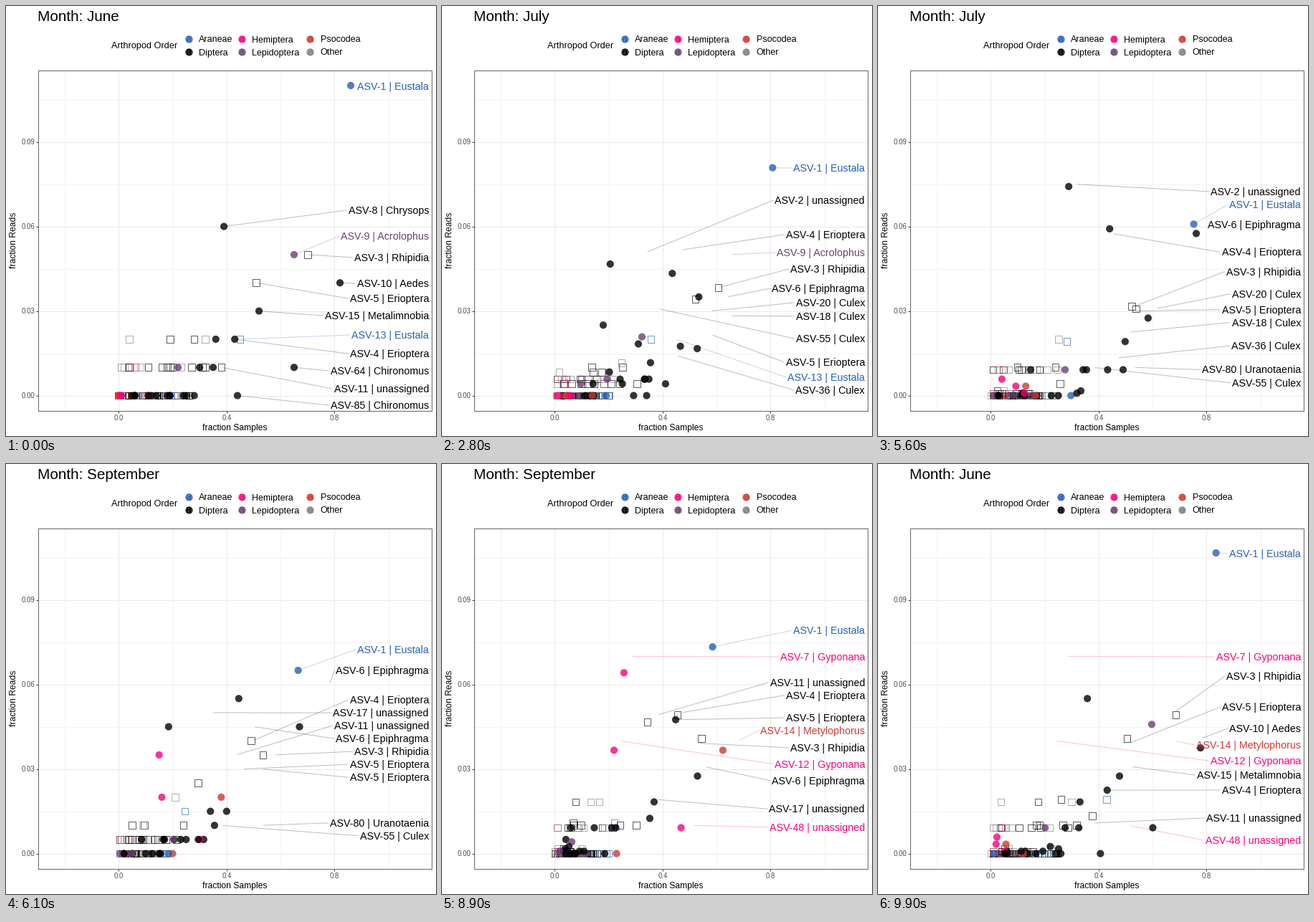
These frames come from a looping animation (600x600 px, 10 s). A matplotlib script:

```python
from itertools import zip_longest

import matplotlib.pyplot as plt
import numpy as np
from matplotlib.animation import FuncAnimation
from matplotlib.collections import LineCollection
from matplotlib.colors import to_rgba

PX = 0.72  # points per pixel at 100 dpi
FRAMES, INTERVAL = 100, 100
MONTHS = ["June", "July", "September"]
STARTS, STEPS = [21, 55, 88], 12
PANEL = (44.5, 89.5, 593.5, 564.5)
COLORS = dict(b="#2860b4", k="#000000", m="#f9007c", p="#6c3f75",
              r="#cb3b33", g="#808080")

plt.rcParams["font.family"] = "Liberation Sans"
rng = np.random.default_rng(7)


def sx(x):
    return 157.2 + 376.6 * x


def sy(y):
    return 543.6 - 3933 * y


# Points: each has a colour, a marker and one position per month,
# given in hundredths of the axis units.
points, taxa = [], {}


def dot(color, marker, *path):
    xy = np.array(path) / 100
    points.append((color, marker, np.column_stack([sx(xy[:, 0]), sy(xy[:, 1])])))


def asv(num, genus, color, marker, *path):
    dot(color, marker, *path)
    taxa[num] = (f"ASV-{num} | {genus}", color, points[-1][2])


# Crowd along the zero line: count and upper/lower x for each month
def crowd(color, count, *spans):
    for _ in range(count):
        dot(color, "s", *[(round(rng.uniform(*s)), 0) for s in spans])


crowd("k", 44, (0, 28), (0, 18), (0, 17))
crowd("g", 20, (0, 12), (0, 27), (0, 9))
crowd("p", 16, (2, 12), (4, 16), (1, 11))
crowd("m", 5, (3, 9), (1, 10), (2, 10))
crowd("r", 9, (0, 1), (1, 9), (3, 13))
crowd("b", 3, (18, 23), (12, 20), (15, 22))

# Squares lifted off the zero line in July or September only
for c, x in zip("krkgkkkgkgg", [1, 3, 5, 7, 11, 12, 15, 18, 19, 22, 26]):
    dot(c, "s", (round(x * .6), 0), (x, 1), (round(x * .4), 0))
for c, x in zip("mgkkpgkgk", [1, 1, 5, 6, 9, 11, 18, 19, 22]):
    dot(c, "s", (round(x * .7), 0), (round(x * .6), 0), (x, 1))

# Squares lifted in June
dot("g", "s", (1, 1), (1, 0), (0, 0))
dot("g", "s", (2, 1), (4, 0), (1, 0))
dot("k", "s", (4, 1), (3, 0), (2, 0))
dot("k", "s", (4, 1), (8, 0), (4, 0))
dot("m", "s", (6, 1), (2, 0), (1, 0))
dot("g", "s", (8, 1), (12, 0), (3, 0))
dot("k", "s", (11, 1), (9, 0), (5, 0))
dot("k", "s", (16, 1), (10, 0), (5, 0))
dot("k", "s", (18, 1), (12, 0), (6, 1))
dot("k", "s", (19, 1), (10, 1), (9, 1))
dot("k", "s", (20, 1), (17, 0), (3, 0))
dot("g", "s", (23, 1), (15, 0), (8, 0))
dot("k", "s", (27, 1), (24, 1), (24, 1))
dot("k", "s", (31, 1), (19, 0), (3, 0))
dot("k", "s", (32, 1), (13, 0), (30, 1))
dot("g", "s", (4, 2), (0, 0), (1, 0))
dot("k", "s", (19, 2), (11, 0), (2, 0))
dot("k", "s", (28, 2), (10, 0), (5, 1))
dot("g", "s", (32, 2), (11, 0), (8, 0))
dot("k", "s", (5, 0), (2, 0), (8, 2))
dot("g", "s", (6, 0), (4, 0), (14, 2))
dot("g", "s", (23, 0), (26, 2), (16, 2))

# Unlabelled circles
dot("k", "o", (30, 1), (3, 0), (1, 0))
dot("k", "o", (35, 1), (18, 0), (7, 0))
dot("k", "o", (36, 2), (9, 0), (1, 0))
dot("k", "o", (28, 0), (37, 1), (4, 0))
dot("k", "o", (12, 0), (11, 0), (22, 1))
dot("k", "o", (19, 0), (11, 0), (23, 1))
dot("k", "o", (14, 0), (13, 0), (7, 0))
dot("p", "o", (22, 1), (1, 0), (0, 0))
dot("p", "o", (6, 0), (29, 1), (12, 0))
dot("r", "o", (11, 0), (16, 0), (24, 0))
dot("b", "o", (1, 0), (32, 0), (5, 0))

asv(1, "Eustala", "b", "o", (86, 11), (77, 6), (56, 7))
asv(2, "unassigned", "k", "o", (6, 0), (31, 8), (6, 1))
asv(3, "Rhipidia", "k", "s", (70, 5), (54, 3), (53, 4))
asv(4, "Erioptera", "k", "o", (43, 2), (44, 6), (45, 5))
asv(5, "Erioptera", "k", "s", (51, 4), (53, 3), (45, 5))
asv(6, "Epiphragma", "k", "o", (19, 0), (78, 6), (56, 3))
asv(7, "Gyponana", "m", "o", (0, 0), (2, 0), (28, 7))
asv(8, "Chrysops", "k", "o", (39, 6), (3, 0), (1, 0))
asv(9, "Acrolophus", "p", "o", (65, 5), (9, 0), (1, 0))
asv(10, "Aedes", "k", "o", (82, 4), (32, 0), (31, 1))
asv(11, "unassigned", "k", "s", (38, 1), (25, 0), (34, 5))
asv(12, "Gyponana", "m", "o", (0, 0), (8, 0), (24, 4))
asv(13, "Eustala", "b", "s", (45, 2), (29, 2), (20, 1))
asv(14, "Metylophorus", "r", "o", (0, 0), (8, 0), (68, 4))
asv(15, "Metalimnobia", "k", "o", (52, 3), (16, 1), (1, 0))
asv(17, "unassigned", "k", "o", (24, 0), (33, 0), (38, 2))
asv(18, "Culex", "k", "o", (11, 0), (53, 2), (15, 1))
asv(20, "Culex", "k", "o", (25, 0), (62, 3), (18, 0))
asv(36, "Culex", "k", "o", (18, 0), (47, 1), (3, 0))
asv(48, "unassigned", "m", "o", (1, 0), (9, 0), (51, 1))
asv(55, "Culex", "k", "o", (5, 0), (38, 1), (8, 0))
asv(64, "Chironomus", "k", "o", (65, 1), (24, 0), (6, 0))
asv(80, "Uranotaenia", "k", "o", (6, 0), (53, 1), (6, 0))
asv(85, "Chironomus", "k", "o", (44, 0), (27, 0), (4, 0))

# Label heights at rest, by month
REST = [
    {1: 112, 8: 285, 9: 321, 3: 351, 10: 387, 5: 408, 15: 432, 13: 459,
     4: 485, 64: 509, 11: 534, 85: 557},
    {2: 249, 1: 271, 6: 308, 4: 337, 3: 375, 20: 404, 5: 426, 18: 453,
     36: 486, 80: 507, 55: 529},
    {1: 243, 7: 269, 11: 301, 4: 323, 5: 347, 14: 367, 3: 392, 12: 419,
     6: 452, 17: 480, 48: 505},
]
# Heights on the way: step, labels taking a new name, labels leaving
VIA = [
    (7, {1: 226, 2: 271, 4: 319, 3: 367, 6: 394, 20: 414, 18: 433, 55: 464,
         5: 497, 36: 536}, {9: 344, 13: 518}),
    (11, {1: 249, 11: 302, 4: 326, 5: 356, 3: 378, 6: 408, 17: 446},
     {6: 272, 5: 426, 55: 494, 80: 512}),
    (11, {1: 125, 3: 296, 5: 339, 10: 369, 15: 434, 4: 455, 11: 494},
     {7: 269, 14: 392, 12: 414, 48: 525}),
]


def pairs(month):
    """Match labels of one month with the next, colour by colour."""
    def ids(m, c):
        return sorted((i for i in REST[m] if taxa[i][1] == c), key=str)

    nxt = (month + 1) % 3
    return [(a, b) for c in COLORS
            for a, b in zip_longest(ids(month, c), ids(nxt, c)) if a]


PAIRS = [pairs(m) for m in range(3)]


def spread(ys, gap=18):
    ys = np.array(ys, float)
    order = np.argsort(ys, kind="stable")
    s = ys[order]
    for _ in range(60):
        for i in range(len(s) - 1):
            push = (gap - (s[i + 1] - s[i])) / 2
            if push > 0:
                s[i] -= push
                s[i + 1] += push
        s = np.minimum(s, 557)
    ys[order] = s
    return ys


def labels_at(month, t):
    nxt = (month + 1) % 3
    step, moving, leaving = VIA[month]
    out = []
    for a, b in PAIRS[month]:
        name, color, pos = taxa[a]
        tip, y0 = pos[month], REST[month][a]
        if b:
            tip = tip + (taxa[b][2][nxt] - tip) * t
            y = np.interp(t, [0, step / STEPS, 1],
                          [y0, moving[b], REST[nxt][b]])
            name = taxa[b if t >= 0.5 else a][0]
        else:
            y = np.interp(t, [0, step / STEPS], [y0, leaving[a]])
        out.append((name, color, tip, y))
    ys = spread([o[3] for o in out]) if t else [o[3] for o in out]
    return [(n, c, p, y) for (n, c, p, _), y in zip(out, ys)]


fig = plt.figure(figsize=(6, 6), dpi=100, facecolor="white")
ax = fig.add_axes([0, 0, 1, 1])
ax.set(xlim=(0, 600), ylim=(600, 0))
ax.axis("off")


def line(xs, ys, color, width, z=1):
    ax.plot(xs, ys, color=color, lw=width * PX, zorder=z,
            solid_capstyle="butt")


def text(x, y, s, size, **kw):
    return ax.text(x, y, s, fontsize=size * PX, **kw)


left, top, right, bottom = PANEL
for i in range(-1, 6):
    if sx(i / 5) < right:
        line([sx(i / 5)] * 2, [top, bottom], "#ebebeb", 0.6 if i % 2 else 1.1)
for i in range(8):
    line([left, right], [sy(i * .015)] * 2, "#ebebeb", 0.6 if i % 2 else 1.1)
line([left, right, right, left, left], [top, top, bottom, bottom, top],
     "#666666", 1, 2)
for v in (0, 0.4, 0.8):
    line([sx(v)] * 2, [bottom, bottom + 3], "#333333", 1)
    text(sx(v), 578.3, f"{v:.1f}", 9.6, ha="center", color="#4d4d4d")
for v in (0, 0.03, 0.06, 0.09):
    line([left - 3, left], [sy(v)] * 2, "#333333", 1)
    text(40, sy(v) + 3.5, f"{v:.2f}", 9.6, ha="right", color="#4d4d4d")
text(319, 592, "fraction Samples", 12.1, ha="center")
text(11, 327, "fraction Reads", 12.1, ha="center", va="center", rotation=90)

# Legend
text(147, 59.5, "Arthropod Order", 12.7)
ORDERS = ["Araneae", "Diptera", "Hemiptera", "Lepidoptera", "Psocodea", "Other"]
for i, (name, c) in enumerate(zip(ORDERS, "bkmprg")):
    x, y = (254.5, 328.5, 424)[i // 2], 46 + 18 * (i % 2)
    ax.scatter([x], [y], s=(10.4 * PX) ** 2, color=COLORS[c], alpha=0.8, lw=0)
    text(x, y + 4.2, "a", 14.2, ha="center", color=COLORS[c])
    text(x + 14.5, y + 4.5, name, 12.5)

title = text(44, 21, "", 20.7)


def layer(marker, **kw):
    rows = [p for p in points if p[1] == marker]
    rgba = [to_rgba(COLORS[p[0]], 0.8) for p in rows]
    paths = np.array([p[2] for p in rows])
    art = ax.scatter(paths[:, 0, 0], paths[:, 0, 1], marker=marker, zorder=4)
    art.set(**kw)
    if marker == "o":
        art.set(facecolors=rgba, edgecolors="none")
    else:
        art.set(facecolors="none", edgecolors=[c[:3] + (0.7,) for c in rgba])
    return art, paths


layers = [layer("s", sizes=[(9.6 * PX) ** 2], linewidths=0.9 * PX),
          layer("o", sizes=[(10.2 * PX) ** 2])]
links = LineCollection([], linewidths=1 * PX, zorder=3)
ax.add_collection(links)
tags = [text(590, 0, "", 14.2, ha="right", zorder=5) for _ in range(14)]


def update(f):
    month = 0 if f < 33 else 1 if f < 67 else 2
    nxt = (month + 1) % 3
    t = min(max((f - STARTS[month]) / STEPS, 0), 1)
    title.set_text("Month: " + MONTHS[nxt if t >= 0.5 else month])
    for art, paths in layers:
        art.set_offsets(paths[:, month] * (1 - t) + paths[:, nxt] * t)

    segs, shades = [], []
    for tag in tags:
        tag.set_text("")
    for tag, (name, c, tip, y) in zip(tags, labels_at(month, t)):
        tag.set(text=name, color=COLORS[c], position=(590, y + 5))
        start = np.array([tag.get_window_extent().x0 - 2, y])
        gap = start - tip
        dist = np.hypot(*gap)
        if dist > 9:
            segs.append([start, tip + gap / dist * 2])
            shades.append(to_rgba(COLORS[c], 0.26))
    links.set_segments(segs)
    links.set_color(shades)
    return []


anim = FuncAnimation(fig, update, frames=FRAMES, interval=INTERVAL,
                     repeat=True, repeat_delay=0, blit=False)
plt.show()
```
